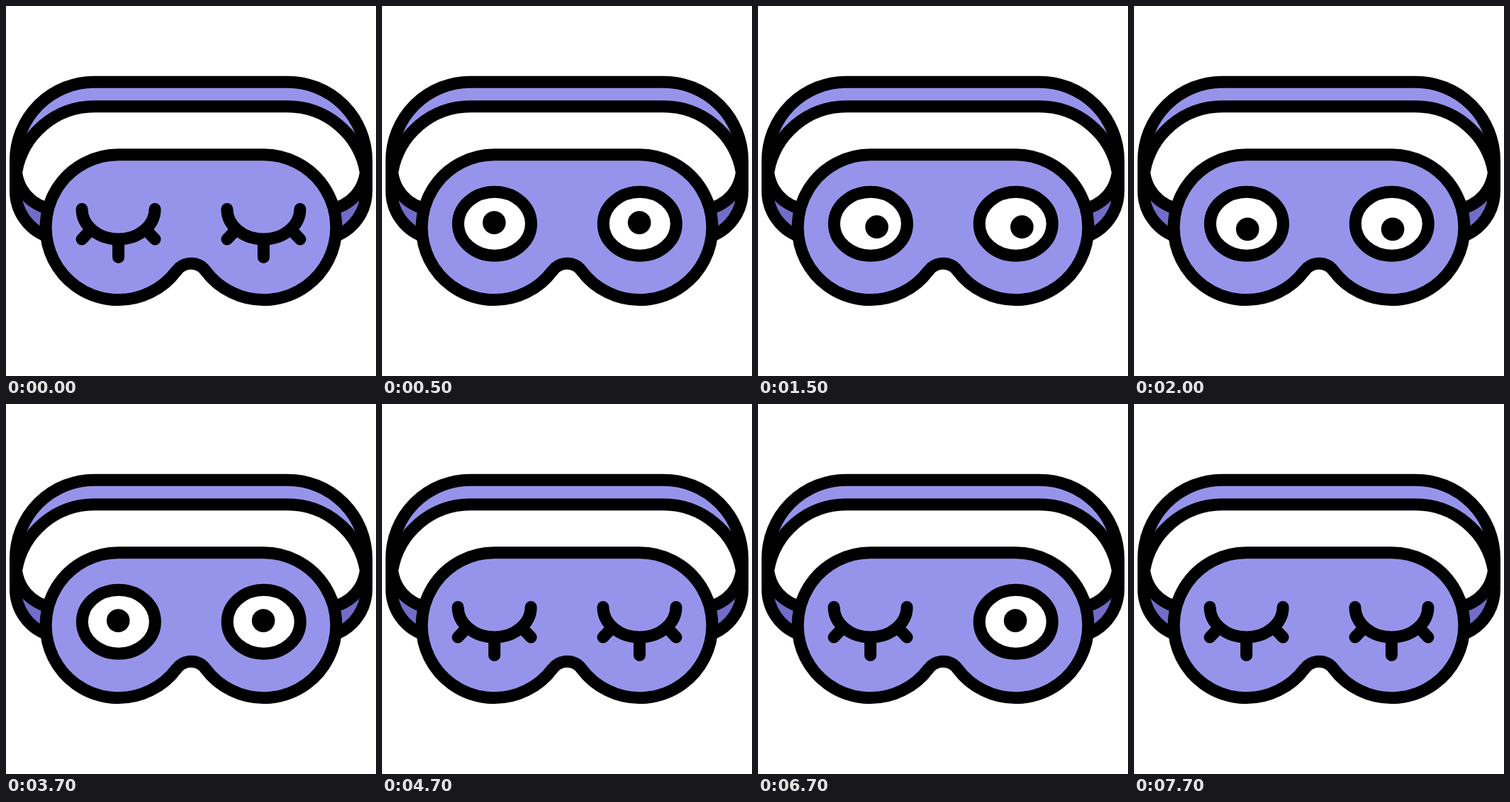
Recreate the animation shown at these times as an HTML page. Size 522 by 522 pixels, loop 8000 ms.

```html
<!DOCTYPE html>
<html lang="en">
<head>
<meta charset="utf-8">
<title>Sleep mask</title>
<style>
  html, body { margin: 0; width: 100%; height: 100%; overflow: hidden; background: #fff; }
  svg { display: block; width: 100vw; height: 100vh; }
</style>
</head>
<body>
<svg viewBox="0 0 522 522">
  <defs>
    <linearGradient id="strap" x2="0" y2="1">
      <stop offset=".58" stop-color="#9694ea"/>
      <stop offset=".58" stop-color="#716dc8"/>
    </linearGradient>
    <path id="lashes" fill="none" d="M-51.5 286.5A51.5 42.5 0 0 0 51.5 286.5M0 329V354.5M-51.5 329L-41 318M51.5 329L41 318"/>
    <ellipse id="eyeball" cx=".3" cy="307.2" rx="51.5" ry="45" fill="#fff"/>
  </defs>
  <g stroke="#000" stroke-width="17" stroke-linecap="round" stroke-linejoin="round">
    <path fill="url(#strap)" d="M58 325A68.3 68.3 0 0 1 13.5 261V218.4A111 111 0 0 1 124.5 107.2H397.5A111 111 0 0 1 508.5 218.4V261A68.3 68.3 0 0 1 464 325"/>
    <path fill="#fff" d="M56 285Q20 272 14.5 235A111.5 111.5 0 0 1 124.5 141.7H397.5A111.5 111.5 0 0 1 507.5 235Q502 272 466 285"/>
    <path fill="#9694ea" d="M158.6 209.8H363.4A102.4 102.4 0 1 1 281.5 373.6A25.6 25.6 0 0 0 240.5 373.6A102.4 102.4 0 1 1 158.6 209.8Z"/>
    <g class="eye" transform="translate(158.6)">
      <use href="#lashes"/>
      <g><use href="#eyeball"/><circle r="16.3" stroke="none"/></g>
    </g>
    <g class="eye" transform="translate(363.4)">
      <use href="#lashes"/>
      <g><use href="#eyeball"/><circle r="16.3" stroke="none"/></g>
    </g>
  </g>
</svg>
<script>
  const LOOP = 8000;
  const GLANCES = [1500, 2000, 2500, 2700];
  const GLANCE_END = 3700;
  const eyes = document.querySelectorAll('.eye');
  const between = (time, start, end) => time >= start && time < end;

  // The pupils jump from right to left in growing steps along a shallow bowl.
  function gaze(time) {
    if (!between(time, GLANCES[0], GLANCE_END)) return [-0.3, 305.6];
    const step = GLANCES.filter(start => start <= time).length - 1;
    const x = 9 - 6 * step - 1.4 * step ** 2;
    return [x, 316 - (x + 6) ** 2 / 52];
  }

  function draw() {
    const time = performance.now() % LOOP;
    const awake = between(time, 500, 4700);
    const peeking = between(time, 6700, 7700);
    const [x, y] = gaze(time);
    eyes.forEach((eye, i) => {
      const [lashes, ball] = eye.children;
      const open = awake || (peeking && i === 1);
      lashes.style.display = open ? 'none' : '';
      ball.style.display = open ? '' : 'none';
      ball.lastElementChild.setAttribute('cx', x);
      ball.lastElementChild.setAttribute('cy', y);
    });
    requestAnimationFrame(draw);
  }
  draw();
</script>
</body>
</html>
```
